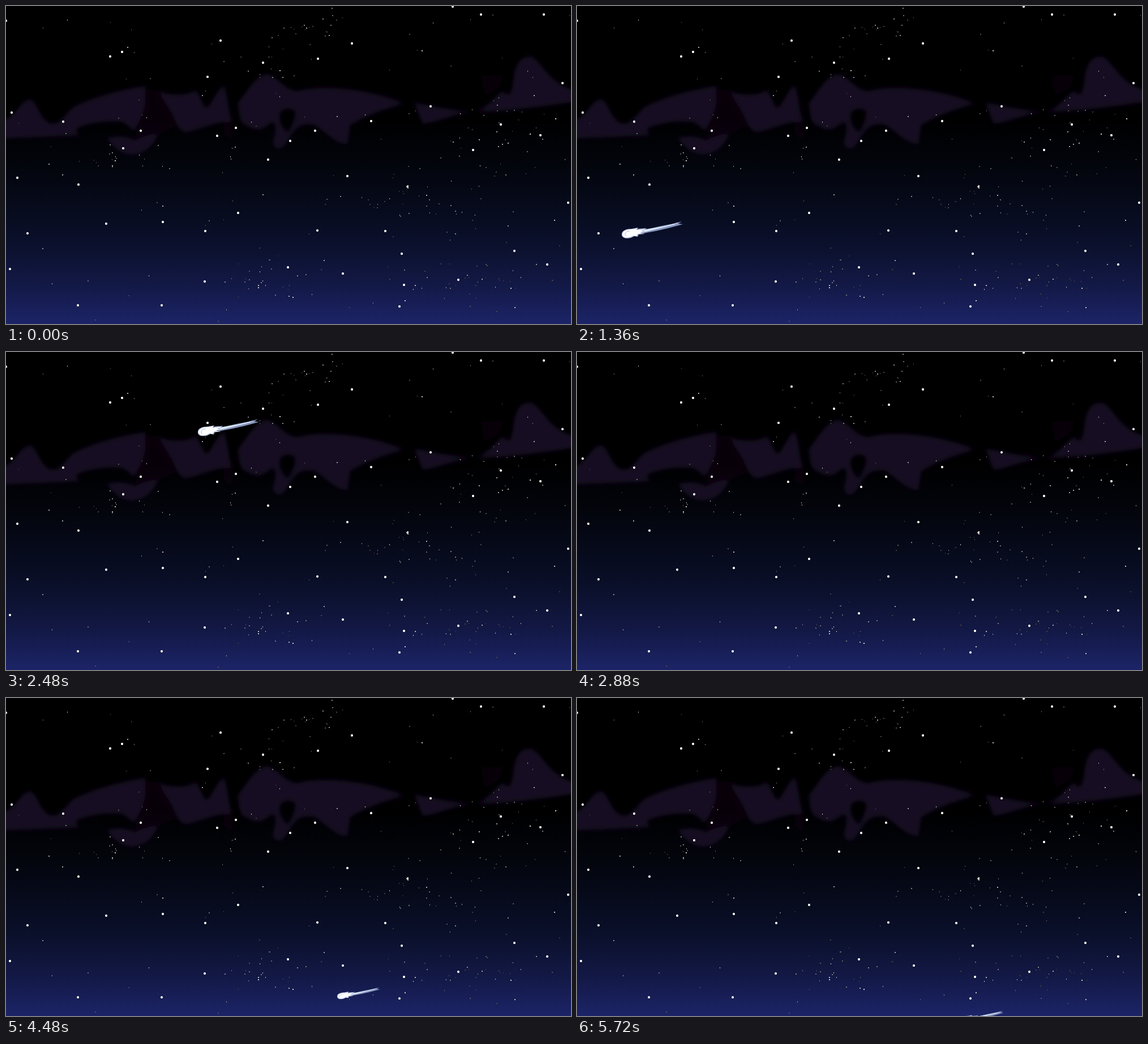
Animation, 998 px wide and 561 px high, one loop 5.76 s. Source, as an HTML page:

```html
<!DOCTYPE html>
<html lang="en">
<head>
<meta charset="utf-8">
<title>Night sky</title>
<style>
html, body { margin: 0; width: 100%; height: 100%; overflow: hidden; background: #000; }
svg { display: block; width: 100%; height: 100%; }
</style>
</head>
<body>
<svg viewBox="0 0 998 561" preserveAspectRatio="none">
  <defs>
    <linearGradient id="sky" x1="0" y1="0" x2="0" y2="1">
      <stop offset="0" stop-color="#000"/>
      <stop offset=".36" stop-color="#000001"/>
      <stop offset=".5" stop-color="#03050c"/>
      <stop offset=".62" stop-color="#060a1a"/>
      <stop offset=".75" stop-color="#0b102c"/>
      <stop offset=".88" stop-color="#131946"/>
      <stop offset="1" stop-color="#1c2468"/>
    </linearGradient>
    <filter id="soft" x="-5%" y="-15%" width="110%" height="130%"><feGaussianBlur stdDeviation="4.5"/></filter>
    <clipPath id="reveal"><path d="M0 0H810V561H0Z"/></clipPath>
    <g id="comet">
      <path fill="#8795bd" d="M28-9 44-10 40-7 70-14 92-18 106-22 100-18 108-17 82-10 60-5 38-1Z"/>
      <path fill="#d9e6f8" d="M26-7 42-8 72-13 100-20 92-16 60-8 36-2Z"/>
      <path fill="#b3c0df" d="M0 1C0-6 8-9 18-9L29-11 27-8 44-10 37-6 42-4 33-2 41 0 30 1 28 5 22 4C16 9 0 10 0 1Z"/>
      <path fill="#fff" d="M1 1C1-5 9-8 18-8L28-10 25-7 40-8 34-5 39-3 31-2 37-1 28 0 26 4 20 3C14 8 1 8 1 1Z"/>
      <path fill="none" stroke="#aebbdd" d="M14-5C6-5 4 1 8 4"/>
    </g>
  </defs>
  <rect width="998" height="561" fill="url(#sky)"/>
  <g fill="#180b21" fill-rule="evenodd" filter="url(#soft)">
    <path d="M-8 203C20 196 24 164 44 165C57 172 58 196 76 206C92 213 100 197 118 179C150 162 200 148 246 141V172C243 192 233 208 226 221C218 214 212 205 200 204C165 202 135 210 121 218L132 228-8 234Z"/>
    <path d="M177 233C195 228 215 230 228 237C245 228 260 225 269 226C260 246 245 262 220 262C200 260 188 246 177 233Z"/>
    <path d="M268 149C285 158 320 160 335 148C345 160 348 180 356 180C368 163 375 146 385 139C393 165 394 190 399 205C375 202 345 217 318 223C300 219 299 196 284 175Z"/>
    <path d="M409 172C425 153 440 122 462 120C485 128 490 148 515 150C560 138 640 146 704 172C660 184 630 197 608 210L603 244C580 242 565 222 545 210C515 204 508 222 497 238C488 258 470 254 472 237C477 222 478 207 470 204C455 218 445 223 425 211C410 206 413 190 409 172ZM486 186C494 179 508 180 511 188C510 200 506 210 498 224C485 214 480 194 486 186Z"/>
    <path d="M720 170C760 178 790 184 825 187C790 190 765 204 737 208C731 200 729 185 720 170Z"/>
    <path d="M825 187C850 182 865 158 878 149C888 163 892 158 896 133C899 102 909 89 925 89C946 92 957 140 1008 149V168C940 179 880 186 825 187Z"/>
    <path opacity=".25" d="M245 145 275 150 300 212 262 230 228 238ZM385 190 400 195V240L384 225ZM838 122H880L870 145 845 160Z"/>
  </g>
  <g id="stars" shape-rendering="crispEdges"></g>
  <g id="comets"></g>
</svg>
<script>
const W = 998, H = 561, LOOP = 5760, STEP = 40, SLOPE = .236;

const svg = (tag, attrs, parent) => {
  const el = document.createElementNS('http://www.w3.org/2000/svg', tag);
  for (const key in attrs) el.setAttribute(key, attrs[key]);
  return parent.appendChild(el);
};

let seed = 17;
const rand = () => (seed = seed * 16807 % 2147483647) / 2147483647;
const spread = () => rand() + rand() - 1;

const sky = document.getElementById('stars');
const dot = (x, y, w, h, grey) => svg('rect', {
  x: Math.round(x), y: Math.round(y), width: w, height: h, fill: `rgb(${grey},${grey},${grey})`
}, sky);

function brightStar(x, y) {
  dot(x - 2, y - 2, 4, 4, 110);
  dot(x - 2, y - 1, 4, 2, 235);
  dot(x - 1, y - 2, 2, 4, 255);
}

function faintStar(x, y) {
  const grey = 60 + Math.floor(rand() ** 2 * 150);
  dot(x, y, 1 + Math.round(rand()), 2, grey);
}

// denser patches of faint stars
const patches = [
  { x: 565, y: 35, rx: 90, ry: 25, count: 18 },
  { x: 470, y: 90, rx: 110, ry: 50, count: 16 },
  { x: 170, y: 270, rx: 130, ry: 40, count: 16 },
  { x: 860, y: 240, rx: 110, ry: 75, count: 26 },
  { x: 720, y: 335, rx: 200, ry: 65, count: 34 },
  { x: 450, y: 475, rx: 70, ry: 45, count: 22 },
  { x: 820, y: 485, rx: 170, ry: 40, count: 32 }
];

function drawStars() {
  // bright stars: one per cell of a loose grid
  const cols = 10, rows = 5;
  for (let i = 0; i < cols * rows; i++)
    brightStar((i % cols + rand()) * W / cols, (Math.floor(i / cols) + rand()) * H / rows);
  for (const { x, y, rx, ry, count } of patches)
    for (let i = 0; i < count; i++) faintStar(x + spread() * rx, y + spread() * ry);
  for (let i = 0; i < 130; i++) faintStar(rand() * W, rand() * H);
}

// x, y: tip of the head at start; v: leftward px per ms; s: size
const passes = [
  { start: 680, end: 1520, x: 963, y: 193.4, v: 1.3, s: 1 },
  { start: 2120, end: 2880, x: 769, y: 39, v: 1.195, s: 1, clip: true },
  { start: 4080, end: 4840, x: 940, y: 442, v: .8875, s: .7 },
  { start: 4640, end: 5480, x: 613, y: -4, v: .85, s: .66 },
  { start: 5320, end: LOOP, x: 1026, y: 485, v: .87, s: .7 }
];

const comets = passes.map(({ clip }) => {
  const holder = svg('g', clip ? { 'clip-path': 'url(#reveal)' } : {}, document.getElementById('comets'));
  return svg('use', { href: '#comet' }, holder);
});

function render(ms) {
  const t = Math.floor(ms % LOOP / STEP) * STEP;
  passes.forEach(({ start, end, x, y, v, s }, i) => {
    const on = t >= start && t < end;
    comets[i].setAttribute('visibility', on ? 'visible' : 'hidden');
    if (!on) return;
    const d = (t - start) * v;
    comets[i].setAttribute('transform', `translate(${x - d} ${y + d * SLOPE}) scale(${s})`);
  });
}

drawStars();
const origin = performance.now();
function tick() {
  render(performance.now() - origin);
  requestAnimationFrame(tick);
}
render(0);
requestAnimationFrame(tick);
</script>
</body>
</html>
```
